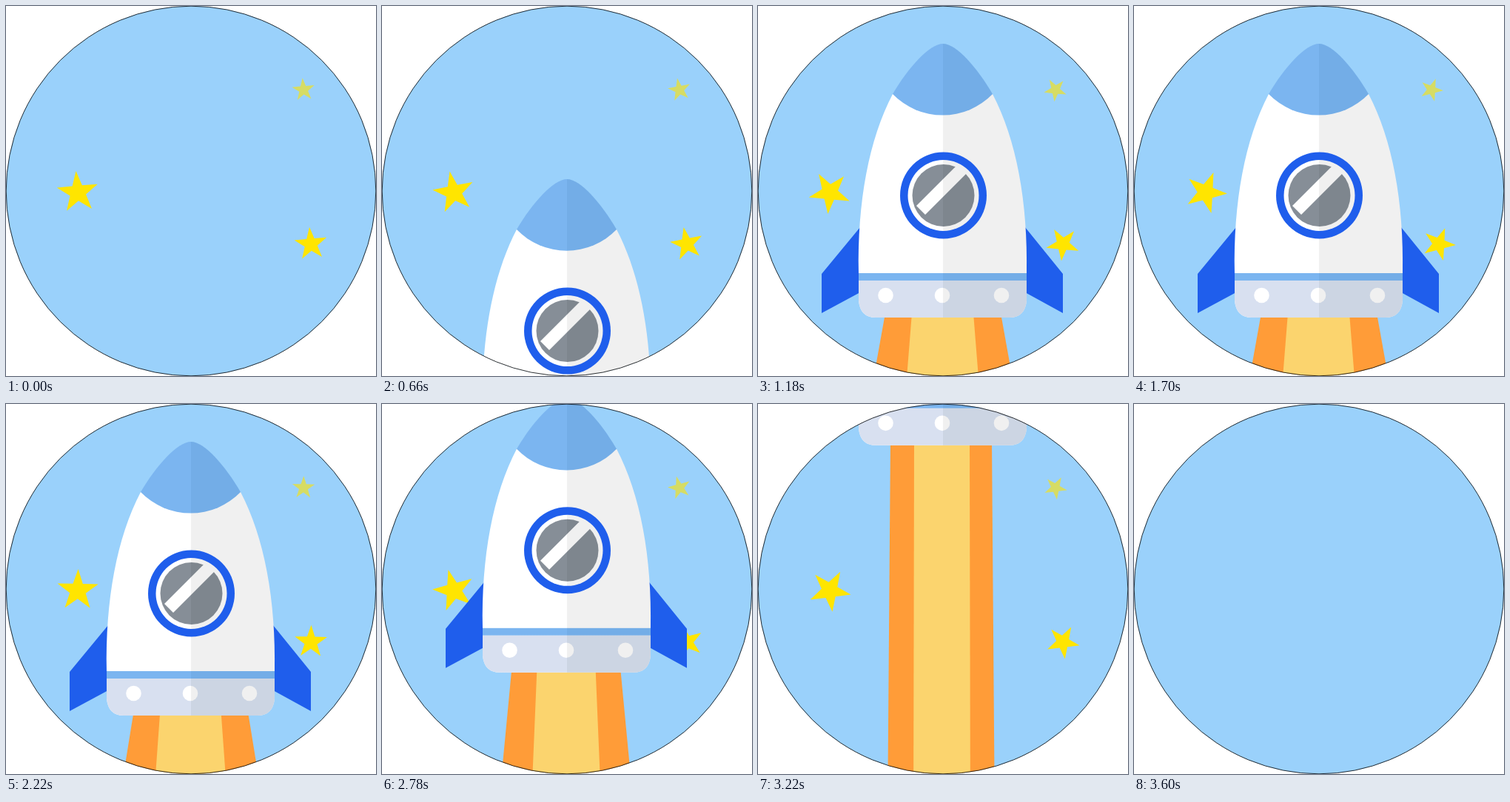
An HTML page with a canvas for the animation above (3620 ms loop, 500 px wide and 500 px high).

```html
<!DOCTYPE html>
<html lang="en">
<head>
<meta charset="utf-8">
<title>Rocket</title>
<style>
  html, body { margin: 0; width: 100%; height: 100%; overflow: hidden; background: #fff; }
  canvas { display: block; }
</style>
</head>
<body>
<canvas id="stage" width="500" height="500"></canvas>
<script>
const ctx = document.getElementById('stage').getContext('2d');
const LOOP = 3620, BLANK_AT = 3600;
const BLUE = '#1f5eec', YELLOW = '#ffe500';

// Two-tone fill: lit left half, shaded right half
function halves(left, right) {
  const g = ctx.createLinearGradient(0, 0, 500, 0);
  g.addColorStop(0, left);
  g.addColorStop(0.5, left);
  g.addColorStop(0.5, right);
  g.addColorStop(1, right);
  return g;
}
const WHITE = halves('#fff', '#f0f0f0');
const SKY = halves('#7bb5f0', '#73ade7');
const METAL = halves('#d8e0f0', '#ccd5e3');
const GLASS = halves('#868e97', '#7e868e');

const BODY = new Path2D('M182 119C150 180 134 265 136 362V398Q138 421 159 421H340Q361 421 363 398V362C365 265 349 180 317 119Z');
const NOSE = new Path2D('M182 119C203 83 232 51 250 51S296 83 317 119A94 94 0 0 1 182 119Z');
const FINS = new Path2D('M138 299L86 362V415L138 387ZM361 299L412 362V415L361 387Z');

function fill(color, path) {
  ctx.fillStyle = color;
  ctx.fill(path);
}

function disc(x, y, r, color) {
  const p = new Path2D();
  p.arc(x, y, r, 0, 2 * Math.PI);
  fill(color, p);
}

function star(x, y, r, angle, alpha = 1) {
  const p = new Path2D();
  for (let i = 0; i < 10; i++) {
    const a = angle + i * Math.PI / 5, d = i % 2 ? r * 0.39 : r;
    p.lineTo(x + d * Math.sin(a), y - d * Math.cos(a));
  }
  ctx.globalAlpha = alpha;
  fill(YELLOW, p);
  ctx.globalAlpha = 1;
}

// Trapezoid below the base; spread is how far each side leans out per pixel
function plume(left, right, spread, color) {
  const top = 415, length = 575, lean = spread * length;
  const p = new Path2D();
  p.lineTo(left, top);
  p.lineTo(right, top);
  p.lineTo(right + lean, top + length);
  p.lineTo(left - lean, top + length);
  fill(color, p);
}

function flame(t) {
  const m = Math.min(1.1, (Math.max(0, t - 1755) / 1465) ** 2);
  plume(172 + 7 * m, 328 - 12 * m, 0.18 - 0.172 * m, '#ff9c38');
  plume(208 + 3 * m, 291 - 5 * m, 0.08 - 0.078 * m, '#fbd46e');
}

function rocketOffset(t) {
  const u = Math.min(1, t / 1120);
  const rise = 500 * (1 - u * u * (3 - 2 * u));
  return rise - 990 * (Math.max(0, t - 2260) / 1340) ** 3;
}

function rocket(t) {
  ctx.save();
  ctx.translate(0, rocketOffset(t));
  flame(t);
  fill(BLUE, FINS);
  fill(WHITE, BODY);
  ctx.save();
  ctx.clip(BODY);
  ctx.fillStyle = SKY;
  ctx.fillRect(130, 361, 240, 10);
  ctx.fillStyle = METAL;
  ctx.fillRect(130, 371, 240, 60);
  ctx.restore();
  fill(SKY, NOSE);
  for (const x of [172.5, 249, 329]) disc(x, 391, 10.3, WHITE);
  disc(250.5, 256, 58.5, BLUE);
  disc(250.5, 256, 48, WHITE);
  disc(250.5, 256, 42, GLASS);
  ctx.strokeStyle = WHITE;
  ctx.lineWidth = 17;
  ctx.beginPath();
  ctx.moveTo(220, 276);
  ctx.lineTo(276, 220);
  ctx.stroke();
  ctx.restore();
}

function draw(t) {
  ctx.clearRect(0, 0, 500, 500);
  disc(250, 250, 250, '#9ad1fb');
  if (t < BLANK_AT) {
    ctx.save();
    ctx.beginPath();
    ctx.arc(250, 250, 250, 0, 2 * Math.PI);
    ctx.clip();
    const spin = (t / 10 - 5) * Math.PI / 180;
    star(97, 252, 29, spin);
    star(412, 321.7, 23, spin);
    star(402, 113.3, 16, spin, 0.6);
    rocket(t);
    ctx.restore();
  }
  ctx.strokeStyle = '#000';
  ctx.lineWidth = 0.8;
  ctx.beginPath();
  ctx.arc(250, 250, 249.8, 0, 2 * Math.PI);
  ctx.stroke();
}

function tick() {
  draw(performance.now() % LOOP);
  requestAnimationFrame(tick);
}
tick();
</script>
</body>
</html>
```
